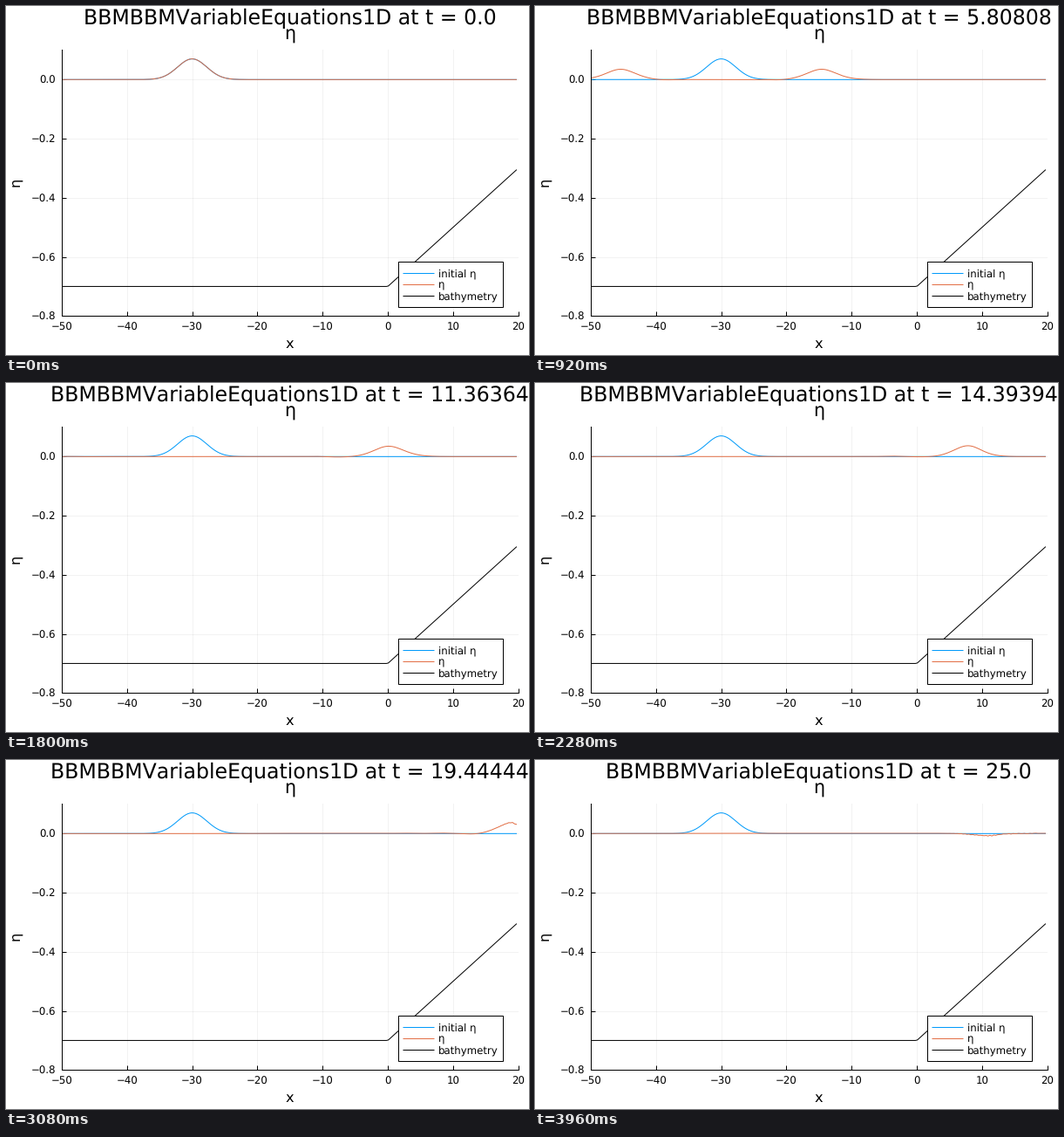
A matplotlib script for the animation above (4000 ms loop, 600 by 400 pixels).

```python
import matplotlib.pyplot as plt
import numpy as np
from matplotlib.animation import FuncAnimation
from matplotlib.lines import Line2D
from matplotlib.patches import Rectangle

W, H, DPI = 600, 400, 100
FRAMES, INTERVAL, T_END = 100, 40, 25.0
BLUE, ORANGE = "#009afa", "#e26f46"
LINE = 0.72  # one pixel
PT = 1.0643  # scale of nominal font sizes

plt.rcParams.update({"font.family": "DejaVu Sans", "text.hinting": "none"})

# Periodic grid, wider than the visible range
N, X_MIN, X_MAX = 512, -130.0, 20.0
G, AMP = 9.81, 0.07
dx = (X_MAX - X_MIN) / N
x = X_MIN + dx * np.arange(N)
depth = 0.7 - 0.02 * np.maximum(x, 0)
eta0 = AMP * np.exp(-0.1 * (x + 30) ** 2)


def stencil(weights):
    """Circulant matrix from {offset: weight}."""
    eye = np.eye(N)
    return sum(w * np.roll(eye, k, axis=1) for k, w in weights.items())


def solve_waves(substeps=8):
    """Surface elevation of the BBM-BBM system at every frame."""
    d1 = stencil({-2: 1, -1: -8, 1: 8, 2: -1}) / (12 * dx)
    d2 = stencil({-2: -1, -1: 16, 0: -30, 1: 16, 2: -1}) / (12 * dx**2)
    k = np.diag(depth**2) / 6
    mass = np.linalg.solve(np.eye(N) - d1 @ k @ d1, -d1)
    momentum = np.linalg.solve(np.eye(N) - d2 @ k, -d1)

    def rate(q):
        eta, v = q
        return np.array([mass @ ((depth + eta) * v),
                         momentum @ (G * eta + v * v / 2)])

    dt = T_END / (FRAMES - 1) / substeps
    q = np.array([eta0, np.zeros(N)])
    states = [eta0]
    for _ in range(FRAMES - 1):
        for _ in range(substeps):
            a = rate(q)
            b = rate(q + dt / 2 * a)
            c = rate(q + dt / 2 * b)
            d = rate(q + dt * c)
            q = q + dt / 6 * (a + 2 * b + 2 * c + d)
        states.append(q[0])
    return states


waves = solve_waves()

fig = plt.figure(figsize=(W / DPI, H / DPI), dpi=DPI, facecolor="white")


def label(px, py, text, size, **kw):
    """Text placed by its baseline, in pixels from the top left."""
    kw = {"ha": "center", "va": "baseline", **kw}
    return fig.text(px / W, 1 - py / H, text, fontsize=size * PT, **kw)


LEFT, RIGHT, TOP, BOTTOM = 63.95, 587.7, 50.45, 355.3
MID = (LEFT + RIGHT) / 2
ax = fig.add_axes([LEFT / W, 1 - BOTTOM / H, (RIGHT - LEFT) / W, (BOTTOM - TOP) / H])
ax.set(xlim=(-50, 20), ylim=(-0.8, 0.1), facecolor="none")
xticks = range(-50, 21, 10)
yticks = [-0.8, -0.6, -0.4, -0.2, 0.0]
ax.set_xticks(xticks)
ax.set_yticks(yticks)
ax.tick_params(direction="in", length=3.8, width=LINE,
               labelbottom=False, labelleft=False)
ax.grid(color="black", alpha=0.05, linewidth=LINE)
ax.set_axisbelow(True)
ax.spines[["top", "right"]].set_visible(False)
ax.spines[["left", "bottom"]].set_linewidth(LINE)

for v in xticks:
    px = LEFT + (v + 50) / 70 * (RIGHT - LEFT)
    label(px, 372, str(v).replace("-", "\u2212"), 8)
for v in yticks:
    py = TOP + (0.1 - v) / 0.9 * (BOTTOM - TOP)
    label(57, py + 4.9, f"{v:.1f}".replace("-", "\u2212"), 8, ha="right")

label(MID, 39, "η", 14)
label(MID, 391.6, "x", 11)
label(19.8, 202, "η", 11, rotation=90, ha="right", va="center")
title = label(MID, 20.8, "", 16)

ax.plot(x, eta0, color=BLUE, lw=LINE)
wave, = ax.plot(x, eta0, color=ORANGE, lw=LINE)
ax.plot(x, -depth, color="black", lw=LINE)

# Legend
fig.add_artist(Rectangle((450.5 / W, 1 - 345.5 / H), 120 / W, 52 / H,
                         transform=fig.transFigure, facecolor="white",
                         edgecolor="black", linewidth=LINE, snap=False,
                         zorder=5))
entries = [("initial η", BLUE), ("η", ORANGE), ("bathymetry", "black")]
for i, (name, color) in enumerate(entries):
    py = 306.5 + 13 * i
    fig.add_artist(Line2D([456 / W, 491 / W], [1 - py / H] * 2,
                          transform=fig.transFigure, color=color,
                          lw=LINE, snap=False, zorder=6))
    label(496, py + 3.8, name, 8, ha="left", zorder=6)


def update(i):
    t = round(T_END * i / (FRAMES - 1), 5)
    # the zero-width joint keeps "V" and "a" from being kerned
    title.set_text(f"BBMBBMV\u200cariableEquations1D at t = {t}")
    wave.set_ydata(waves[i])
    return wave, title


anim = FuncAnimation(fig, update, frames=FRAMES, interval=INTERVAL,
                     init_func=lambda: update(0), repeat=True, repeat_delay=0)
plt.show()
```
